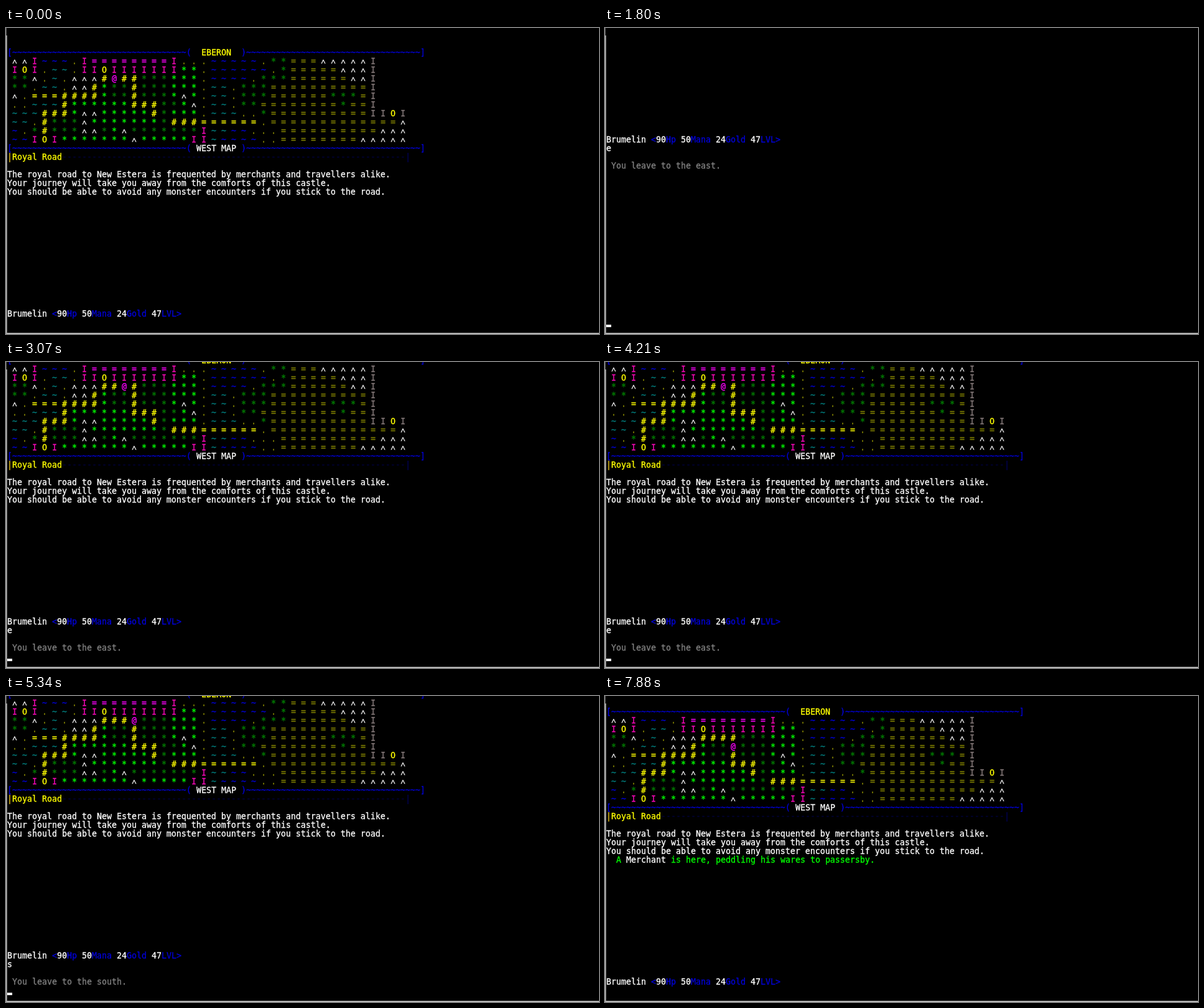
Recreate the animation shown at these times as an HTML page. Size 953 by 492 pixels, loop 8 s.

```html
<!DOCTYPE html>
<html lang="en">
<head>
<meta charset="utf-8">
<title>Text adventure</title>
<style>
  html, body { margin: 0; width: 100%; height: 100%; overflow: hidden; background: #000; }
  svg { display: block; width: 953px; height: 492px; }
  text { font: 13.29px "DejaVu Sans Mono", "Noto Sans Mono", monospace; stroke-width: .3px; }
  .peak { font-family: "Noto Sans Mono", monospace; }
</style>
</head>
<body>
<svg id="stage" viewBox="0 0 953 492">
  <rect width="953" height="492" fill="#000"/>
  <g id="rows"></g>
  <rect id="cursor" y="477" width="8" height="4" fill="#fff"/>
  <rect width="1" height="12" fill="#606060"/>
  <rect y="12" width="1" height="480" fill="#b4b4b4"/>
  <rect x="1" y="12" width="1" height="478" fill="#808080"/>
  <rect y="490" width="953" height="1" fill="#a0a0a0"/>
  <rect y="491" width="953" height="1" fill="#c0c0c0"/>
</svg>
<script>
const CELL = 8, LINE = 14, ROWS = 35, LEFT = 2, BASE = 2, LOOP = 8000;
const WHITE = '#fff', BLUE = '#0000d8', YELLOW = '#ff0', GREY = '#808080',
      GREEN = '#0f0', OLIVE = '#808000', FAINT = '#000038';

// tile code -> [glyph, colour]
const TILES = {
  '^': ['^', WHITE], I: ['I', '#f808b8'], i: ['I', '#887c7c'], O: ['O', YELLOW],
  B: ['~', BLUE], '~': ['~', '#008080'], '.': ['.', OLIVE],
  '*': ['*', '#008000'], '+': ['*', GREEN], '#': ['#', YELLOW],
  '=': ['=', OLIVE], '-': ['=', YELLOW], m: ['=', '#f0f'], '@': ['@', '#f0f']
};
const MAP = [
  '^^IBBB.ImmmmmmmmI...BBBBB.**===^^^^^i',
  'IOI.~~.IIOIIIIIII++.BBBBBB.*=====^^^i',
  '**^.~.^^^####***+++.BBBB.***======^^i',
  '**.~~.^^#+**#***+++.~~.***==========i',
  '^.---####+**#***+^+.~~.***======***=i',
  '..~~~#++++++###**+^.~~.**========*==i',
  '~~~###+^^+++++#*+++.~~~..*==========iiOi',
  '~~.#***^+++++++*###------.=============^',
  'B.*#***^^*+^*******I~~BB...==========^^^',
  'BBIOI+++++++^+++++II~BBBB..========^^^^^'
];

// A line is a list of runs: [column, text, colour]
const border = (col, name, color) => [
  [0, '[' + '~'.repeat(35) + '(', BLUE],
  [col, name, color],
  [47, ')' + '~'.repeat(35) + ']', BLUE]
];
const mapLine = (tiles, y, hero) => [...tiles].map((code, x) => {
  const [glyph, color] = TILES[y === hero[0] && x === hero[1] ? '@' : code];
  return [1 + 2 * x, glyph, color];
});
const blanks = n => Array.from({ length: n }, () => []);
const say = s => [[1, s, GREY]];

const PROMPT = [
  [0, 'Brumelin', WHITE], [9, '<', BLUE],
  [10, '90', WHITE], [12, 'Hp', BLUE], [15, '50', WHITE], [17, 'Mana', BLUE],
  [22, '24', WHITE], [24, 'Gold', BLUE], [29, '47', WHITE], [31, 'LVL>', BLUE]
];
const STORY = [
  'The royal road to New Estera is frequented by merchants and travellers alike.',
  'Your journey will take you away from the comforts of this castle.',
  'You should be able to avoid any monster encounters if you stick to the road.'
].map(s => [[0, s, WHITE]]);
const MERCHANT = [
  [2, 'A', GREEN], [4, 'Merchant', WHITE],
  [13, 'is here, peddling his wares to passersby.', GREEN]
];

const log = blanks(ROWS);

// Appends a room and returns the index of its input line
function room(hero, extra = []) {
  log.push(
    border(39, 'EBERON', YELLOW),
    ...MAP.map((tiles, y) => mapLine(tiles, y, hero)),
    border(38, 'WEST MAP', WHITE),
    [[0, '|', '#f0c818'], [1, 'Royal Road', YELLOW], [11, '-'.repeat(69), FAINT], [80, '|', '#000058']],
    [], ...STORY, ...extra, ...blanks(13), PROMPT
  );
  return log.length;
}
function walk(key, to, from) {
  log.push([[0, key, WHITE]], [], say(`You leave to the ${to}.`), ...blanks(39),
    say(`You arrive from the ${from}.`), ...blanks(10));
}

const a = room([2, 10]);
walk('e', 'east', 'west');
const b = room([2, 11]);
walk('e', 'east', 'west');
const c = room([2, 12]);
walk('s', 'south', 'north');
const d = room([3, 12], [MERCHANT]);
log.push([]);

// [ms, bottom line, cursor column, cursor shown]
const STEPS = [
  [0, a, 0, 0], [120, a, 1, 1], [310, a + 3, 0, 1], [1130, a + 3, 0, 0], [1590, a + 3, 0, 1],
  [1800, a + 20, 0, 1], [1840, a + 38, 0, 1], [1890, a + 61, 41, 1],
  [1930, b, 0, 1], [2640, b, 0, 0], [2920, b, 1, 1],
  [3070, b + 3, 0, 1], [3660, b + 3, 0, 0], [4210, b + 3, 0, 1],
  [4550, b + 20, 0, 1], [4590, b + 38, 0, 1], [4630, b + 61, 41, 1],
  [4670, c, 0, 1], [5230, c, 1, 1], [5280, c + 1, 0, 1],
  [5340, c + 3, 0, 1], [6260, c + 3, 0, 0],
  [6790, c + 20, 0, 1], [6840, c + 38, 0, 1], [6900, c + 50, 0, 1], [6950, c + 66, 0, 1],
  [6990, d, 0, 1], [7880, d, 0, 0]
];

const rows = document.getElementById('rows');
const cursor = document.getElementById('cursor');
const node = tag => document.createElementNS('http://www.w3.org/2000/svg', tag);

function drawLine(runs, row, limit) {
  const line = node('text');
  const y = BASE + row * LINE;
  for (const [col, str, color] of runs) {
    const shown = str.slice(0, Math.max(0, limit - col));
    if (!shown) continue;
    const peak = shown === '^';
    const span = node('tspan');
    span.setAttribute('x', LEFT + col * CELL);
    span.setAttribute('y', peak ? y + 2 : y);
    span.setAttribute('fill', color);
    span.setAttribute('stroke', color);
    if (peak) span.setAttribute('class', 'peak');
    span.textContent = shown;
    line.append(span);
  }
  return line;
}

function draw([, bottom, col, on]) {
  const top = bottom - ROWS + 1;
  rows.replaceChildren(...log.slice(top, bottom + 1).map((runs, i) =>
    drawLine(runs, i, i === ROWS - 1 ? col : Infinity)));
  cursor.setAttribute('x', LEFT + col * CELL);
  cursor.setAttribute('visibility', on ? 'visible' : 'hidden');
}

let current;
const start = performance.now();
function tick() {
  const t = (performance.now() - start) % LOOP;
  const step = STEPS.findLast(s => s[0] <= t);
  if (step !== current) draw(current = step);
  requestAnimationFrame(tick);
}
tick();
</script>
</body>
</html>
```
